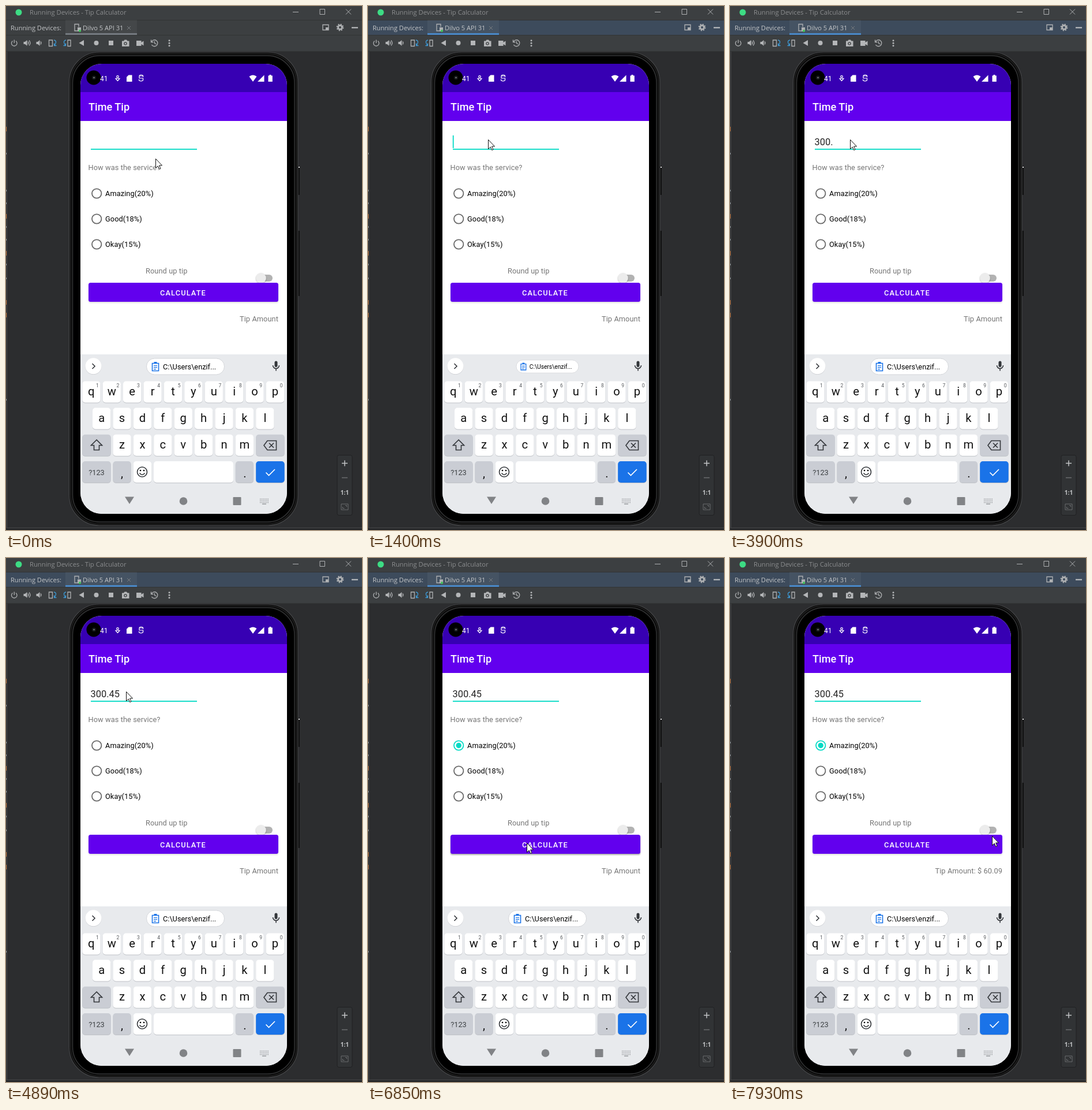
An HTML page that plays this animation: 617 by 907 pixels, repeating every 8000 ms.

```html
<!DOCTYPE html>
<html lang="en">
<head>
<meta charset="utf-8">
<title>Tip calculator demo</title>
<style>
  html, body { margin: 0; width: 100%; height: 100%; overflow: hidden; background: #2c2d2f; }
  svg { display: block; }
  text { font: 12.75px Roboto, sans-serif; white-space: pre; }
  .ide { font: 11.1px "Open Sans", sans-serif; fill: #c3c5c7; }
  .label { letter-spacing: .1px; fill: #757575; }
  .choice { letter-spacing: .1px; }
  .mid { text-anchor: middle; }
  .end { text-anchor: end; }
  .letter { font-size: 20.2px; fill: #111; text-anchor: middle; }
  .hint { font-size: 8.5px; fill: #55585c; text-anchor: middle; }
  .line { fill: none; stroke: #afb1b3; stroke-width: 1.3; }
  .dark { fill: none; stroke: #33363a; stroke-width: 1.6; }
</style>
</head>
<body>
<svg width="617" height="907">
  <defs>
    <clipPath id="screenClip"><rect x="129" y="100" width="358" height="779" rx="37"/></clipPath>
    <clipPath id="buttonClip"><rect x="143" y="479" width="329" height="33" rx="3.5"/></clipPath>
    <filter id="soft" x="-30%" y="-50%" width="160%" height="200%"><feGaussianBlur stdDeviation="1.3"/></filter>
  </defs>

  <!-- Window frame -->
  <rect width="617" height="907" fill="#2c2d2f"/>
  <g id="codeEdge"></g>
  <path d="M1.5 78V903M1 903.5H617" stroke="#48494b" fill="none"/>
  <rect y="904" width="617" height="3" fill="#252628"/>
  <rect width="617" height="78" fill="#3c3f41"/>
  <rect id="header" y="24" width="617" height="26" fill="#3c3f41"/>
  <path d="M0 24.5H617M0 50.5H617M0 78.5H617" stroke="#323435"/>
  <circle cx="22" cy="11" r="5.5" fill="#3ddc84"/>
  <text class="ide" x="41" y="15" style="font-size:11.25px;fill:#8b8d8f">Running Devices - Tip Calculator</text>
  <path class="line" style="stroke-width:1" d="M497 10.5h10M544 5.5h8.5v9h-8.5zM589 5.5l9 9m0-9l-9 9"/>

  <!-- Tool window header -->
  <text class="ide" x="8" y="42">Running Devices:</text>
  <rect x="103" y="24" width="124" height="25" fill="#fff" opacity=".045"/>
  <rect id="tabLine" x="103" y="47" width="124" height="3"/>
  <path class="line" d="M124 43h-5V31.500h7V36"/>
  <rect x="124" y="37" width="6" height="7" fill="#afb1b3"/><circle cx="128" cy="43" r="2" fill="#3fc45a"/>
  <text class="ide" x="133" y="42">Dilvo 5 API 31</text>
  <path d="M210 35l6 6m0-6l-6 6" stroke="#777b7e"/>
  <path class="line" d="M549 32.500h10v9h-10z"/><rect x="554" y="37" width="5" height="5" fill="#afb1b3"/>
  <circle class="line" cx="579" cy="37" r="3.4" style="stroke-width:2.800"/>
  <circle class="line" cx="579" cy="37" r="5.400" style="stroke-width:2;stroke-dasharray:2.120 2.120"/>
  <path d="M599 37.500h11" stroke="#c3c5c7" stroke-width="2"/>

  <!-- Device toolbar -->
  <g class="line">
    <path d="M11.500 60.500a4.800 4.800 0 1 0 5.500 0M14.300 58.500v5.500"/>
    <path d="M38 61.500q2 2.500 0 5m2-7q4 4.500 0 9M60 61.500q2 2.500 0 5"/>
    <path d="M74.500 59h6v10.500h-6zM107 59h5v10.500h-5z"/>
    <path d="M83 59q5 1 3 5.500l-2 4m-.5-4v4h4M104 59q-5 1-3 5.500l2 4m.5-4v4h-4" stroke="#3d9bd8"/>
    <path d="M252.500 61.500a5.500 5.500 0 1 1 0 5.500M251.500 58.500v4h4M257.500 61v3.500l3 1.500"/>
  </g>
  <g fill="#b4b6b8">
    <path d="M30.500 62h2.500l3.500-3v10l-3.500-3h-2.500zM52.500 62h2.500l3.500-3v10l-3.500-3h-2.500z"/>
    <path d="M126.500 64l8.500-5v10z"/><circle cx="156.500" cy="64" r="4"/><rect x="178" y="60" width="8" height="8"/>
    <path d="M201 60.500h3l1.500-2h3.500l1.500 2h3v9.500h-12.500z"/><circle cx="207" cy="65" r="2.800" fill="#3c3f41"/><circle cx="207" cy="65" r="1.500"/>
    <path d="M226 60h8.500v3l4-2.500v8l-4-2.500v3h-8.500z"/>
    <circle cx="283" cy="59.800" r="1.500"/><circle cx="283" cy="64.300" r="1.500"/><circle cx="283" cy="68.800" r="1.500"/>
  </g>

  <!-- Zoom controls -->
  <rect x="574" y="777.500" width="26" height="104" rx="3" fill="#313335" stroke="#202123"/>
  <path d="M582 791.500h10m-5-5v10" stroke="#c3c5c7" stroke-width="1.500"/>
  <path d="M582 816.500h10" stroke="#6a6c6e" stroke-width="1.500"/>
  <text class="ide mid" x="587" y="846" style="font-size:10px;font-weight:700">1:1</text>
  <path d="M581 862h12v10h-12zM583.500 867v2.500h3M588 864.500h2.500v2.500" fill="none" stroke="#6a6c6e"/>

  <!-- Phone body -->
  <path d="M507.500 277v50M507.500 389v113" stroke="#0b0b0b" stroke-width="2.500"/>
  <rect x="507" y="278" width="2" height="2" fill="#ddd"/>
  <rect x="109.500" y="80" width="396.500" height="819" rx="52" fill="#090909" stroke="#444547" stroke-width="1.200"/>
  <rect x="112" y="82.500" width="391.500" height="814" rx="50" fill="none" stroke="#1d1d1d" stroke-width="2"/>
  <rect x="115.500" y="86" width="384.500" height="807" rx="47" fill="#000" stroke="#353637" stroke-width="1.400"/>

  <g clip-path="url(#screenClip)">
    <rect x="129" y="100" width="358" height="779" fill="#fff"/>
    <rect x="129" y="100" width="358" height="49" fill="#3700b3"/>
    <rect x="129" y="149" width="358" height="50" fill="#6200ee"/>
    <circle cx="152" cy="124" r="12.500"/><circle cx="152.500" cy="124" r="3.500" fill="#15181c"/><circle cx="152.500" cy="124" r="1.300" fill="#777"/>
    <text x="163" y="130" fill="#fff" style="font-size:12px">41</text>
    <g fill="none" stroke="#fff" stroke-width="1.200">
      <circle cx="193.500" cy="122.500" r="1.800"/><path d="M189.500 125l4 4.500 4-4.500M191 126l2.500-1.500 2.500 1.500"/>
      <path d="M237.500 121h-6.500v4h6.500v3.500q-3.500 3-7 0v-1.500M237.500 123v-2.500q-3.500-2.500-6.500 0"/>
    </g>
    <g fill="#fff">
      <path d="M209 123l3.500-3.500h6v11.500h-9.500z"/>
      <path d="M421.500 122q6.500-5 13 0l-6.500 9zM436 131l11.500-11.500v11.500z"/>
      <path d="M454.500 120.500h2v-1.500h3v1.500h2.300v10.500h-7.300z"/>
    </g>
    <text x="143" y="181" fill="#fff" style="font-size:18.200px;font-weight:500">Time Tip</text>

    <!-- Form -->
    <text id="amount" x="146.500" y="241" fill="#212121" style="font-size:16.400px"></text>
    <rect x="147" y="247" width="184" height="1.800" fill="#03dac5"/>
    <rect id="caret" y="224" width="1.800" height="22" fill="#03dac5"/>
    <text class="label" x="142.500" y="284">How was the service?</text>
    <circle id="radioRipple" cx="157.200" cy="324.500" r="15" fill="#03dac5"/>
    <g id="radios"></g>
    <circle id="dot" cx="157.200" cy="324.500" fill="#03dac5"/>
    <text class="label" x="242" y="463">Round up tip</text>
    <rect x="438" y="465" width="24" height="12" rx="6" fill="#b2b2b2"/>
    <circle cx="442" cy="472" r="9" opacity=".25" filter="url(#soft)"/>
    <circle cx="442" cy="471" r="8.800" fill="#ececec"/>
    <rect id="shadow" x="143" y="481" width="329" height="33" rx="3.500" filter="url(#soft)"/>
    <rect x="143" y="479" width="329" height="33" rx="3.500" fill="#6200ee"/>
    <circle id="buttonRipple" cx="275" cy="493" fill="#fff" clip-path="url(#buttonClip)"/>
    <text x="267" y="501" fill="#fff" style="font-weight:500;letter-spacing:1.140px">CALCULATE</text>
    <text id="result" class="label end" x="472" y="546"></text>

    <!-- Keyboard -->
    <rect x="129" y="603" width="358" height="276" fill="#e8eaed"/>
    <circle cx="151.500" cy="624" r="14" fill="#c8cace"/><circle cx="151.500" cy="623.300" r="14" fill="#fff"/>
    <path class="dark" d="M149.500 619l4.500 4.500-4.500 4.500"/>
    <g id="chip">
      <rect x="-67.500" y="-14" width="135" height="28" rx="14" fill="#fff" stroke="#d3d5d9"/>
      <path d="M-57.500-5.500h11v13h-11z" fill="none" stroke="#1a73e8" stroke-width="1.600"/>
      <path d="M-54.500-8h5v3h-5zM-55-2h6v1.300h-6zM-55 1h6v1.300h-6zM-55 4h4v1.300h-4z" fill="#1a73e8"/>
      <text x="-39" y="5">C:\Users\enzif...</text>
    </g>
    <rect x="465.500" y="614.500" width="5" height="10.500" rx="2.500" fill="#33363a"/>
    <path class="dark" d="M462.500 622a5.500 5.500 0 0 0 11 0M468 628v3.500"/>
    <g id="keys"></g>
    <path class="dark" d="M157 751l-9.500 9.500h5v8h9v-8h5z"/>
    <path class="dark" d="M447 760.500l6-8h15.500v16h-15.500zM456 756.500l8 8m0-8l-8 8"/>
    <text class="mid" x="157" y="812" fill="#3c4043">?123</text>
    <text class="letter" x="201" y="816">,</text><text class="letter" x="414" y="816">.</text>
    <g class="dark"><circle cx="236" cy="806.500" r="8.500"/><path d="M231.500 808.500q4.500 6 9 0"/></g>
    <circle cx="233" cy="804" r="1.300"/><circle cx="239" cy="804" r="1.300"/>
    <path d="M450.500 807.500l5 5 10.500-10.500" fill="none" stroke="#fff" stroke-width="1.700"/>
    <g fill="#818386">
      <path d="M206 849.500h16l-8 12.500z"/><circle cx="307.500" cy="857" r="6.800"/><rect x="393.500" y="850" width="14" height="14" rx="1"/>
    </g>
    <path d="M440 853.500h15M440 856.500h15M440 859.500h15" stroke="#9a9ca0" stroke-width="1.500" stroke-dasharray="1.500 1.200"/>
    <path d="M444 862h7" stroke="#9a9ca0" stroke-width="1.500"/>
  </g>
  <path id="pointer" d="M.5.500V16.500L4.200 13 6.700 18.500 9 17.500 6.600 12H11.500Z" fill="#fff" stroke="#111"/>
</svg>

<script>
const $ = id => document.getElementById(id);
const set = (id, attrs) => Object.entries(attrs).forEach(([k, v]) => $(id).setAttribute(k, v));

// Slivers of the editor behind the window
$("codeEdge").innerHTML = [213, 258, 322, 344, 364, 385, 407, 428, 450, 474, 513, 535, 684]
  .map(y => `<rect y="${y - 4}" width="1.500" height="${[213, 364, 428, 513, 535].includes(y) ? 8 : 3}"
    fill="${[213, 364, 428, 513, 535].includes(y) ? "#b96a30" : "#8d9297"}"/>`).join("");

$("radios").innerHTML = ["Amazing(20%)", "Good(18%)", "Okay(15%)"].map((label, i) => {
  const y = 324.5 + 44 * i;
  return `<circle id="ring${i}" cx="157.200" cy="${y}" r="8.200" fill="none" stroke="#686868" stroke-width="1.800"/>
    <text class="choice" x="172" y="${y + 4.7}">${label}</text>`;
}).join("");

const PITCH = 35.4;
function key(x, y, width, fill = "#fff", label = "", hint = "") {
  return `<rect x="${x}" y="${y + 1}" width="${width}" height="37" rx="5" fill="#bfc2c7"/>
    <rect x="${x}" y="${y}" width="${width}" height="37" rx="5" fill="${fill}"/>
    <text class="letter" x="${x + width / 2}" y="${y + 24.3}">${label}</text>
    <text class="hint" x="${x + 26.3}" y="${y + 10}">${hint}</text>`;
}
const keyRow = (letters, x, y, hints = "") =>
  [...letters].map((c, i) => key(x + i * PITCH, y, 31.3, "#fff", c, hints[i])).join("");
const GRAY = "#cacdd4";
$("keys").innerHTML =
  keyRow("qwertyuiop", 132.2, 649.5, "1234567890") +
  keyRow("asdfghjkl", 150, 695.5) +
  key(132.2, 741.8, 49.5, GRAY) + keyRow("zxcvbnm", 185.4, 741.8) + key(433.2, 741.8, 49.5, GRAY) +
  key(132.2, 788, 49.5, GRAY) + key(185.4, 788, 31.3, GRAY) + key(220.8, 788, 31.3) +
  key(256, 788, 138) + key(397.8, 788, 31.3, GRAY) + key(433.2, 788, 49.5, "#1a73e8");

// Each track lists [start time, value...] and holds every value until the next
const tracks = {
  pointer: [[0, 259, 264], [650, 232, 253], [800, 208, 247], [960, 207, 245], [1110, 207, 233], [1260, 208, 231],
    [5040, 191, 185], [5180, 200, 214], [5300, 217, 262], [5430, 232, 301], [5550, 237, 315],
    [6080, 241, 340], [6200, 252, 422], [6310, 263, 475], [6460, 272, 488], [6580, 275, 493],
    [7120, 330, 498], [7240, 428, 508], [7360, 489, 514], [7510, 525, 513],
    [7660, 478, 492], [7780, 454, 483], [7930, 454, 481]],
  caret: [[0, 0], [250, 1], [650, 0], [1260, 1], [2190, 0], [2570, 1], [3190, 0], [3310, 1], [3900, 0],
    [4050, 1], [4890, 0], [5430, 1], [5830, 0], [6310, 1], [6850, 0], [7360, 1], [7780, 0]],
  typed: [[0, 0], [1650, 1], [2570, 2], [2690, 3], [3310, 4], [4050, 5], [4360, 6]],
  chip: [[0, 1], [1400, .8], [1520, .95], [1650, 1]],
  dot: [[0, 0], [5960, 2], [6080, 3.5], [6200, 5.2], [6460, 4.9], [6580, 4.7]],
  radioRipple: [[0, 0], [5830, .12], [5960, .24], [6080, .18], [6200, .08], [6310, 0]],
  press: [[0, 0], [6850, 1], [7240, .5], [7360, 0]],
  buttonRipple: [[0, 0, 0], [7000, 90, .22], [7120, 200, .24], [7240, 300, .2],
    [7360, 300, .134], [7510, 300, .05], [7660, 0, 0]]
};
const valueAt = (name, t) => tracks[name].findLast(step => step[0] <= t).slice(1);

function draw(t) {
  const focused = t >= 1400, checked = t >= 5960;
  set("header", { fill: focused ? "#3d4b5c" : "#3c3f41" });
  set("tabLine", { fill: focused ? "#4a88c7" : "#747a80" });

  $("amount").textContent = "300.45".slice(0, valueAt("typed", t)[0]);
  set("caret", { x: 146.8 + $("amount").getComputedTextLength(), opacity: valueAt("caret", t)[0] });
  set("chip", { transform: `translate(311 624) scale(${valueAt("chip", t)[0]})` });

  set("ring0", { stroke: checked ? "#03dac5" : "#686868" });
  set("dot", { r: valueAt("dot", t)[0] });
  set("radioRipple", { opacity: valueAt("radioRipple", t)[0] });

  const [radius, opacity] = valueAt("buttonRipple", t);
  set("buttonRipple", { r: radius, opacity });
  set("shadow", { opacity: .12 + .2 * valueAt("press", t)[0] });
  $("result").textContent = t >= 7120 ? "Tip Amount: $ 60.09" : "Tip Amount";
  set("pointer", { transform: `translate(${valueAt("pointer", t)})` });
}

const start = performance.now();
function loop() {
  draw((performance.now() - start) % 8000);
  requestAnimationFrame(loop);
}
loop();
</script>
</body>
</html>
```
